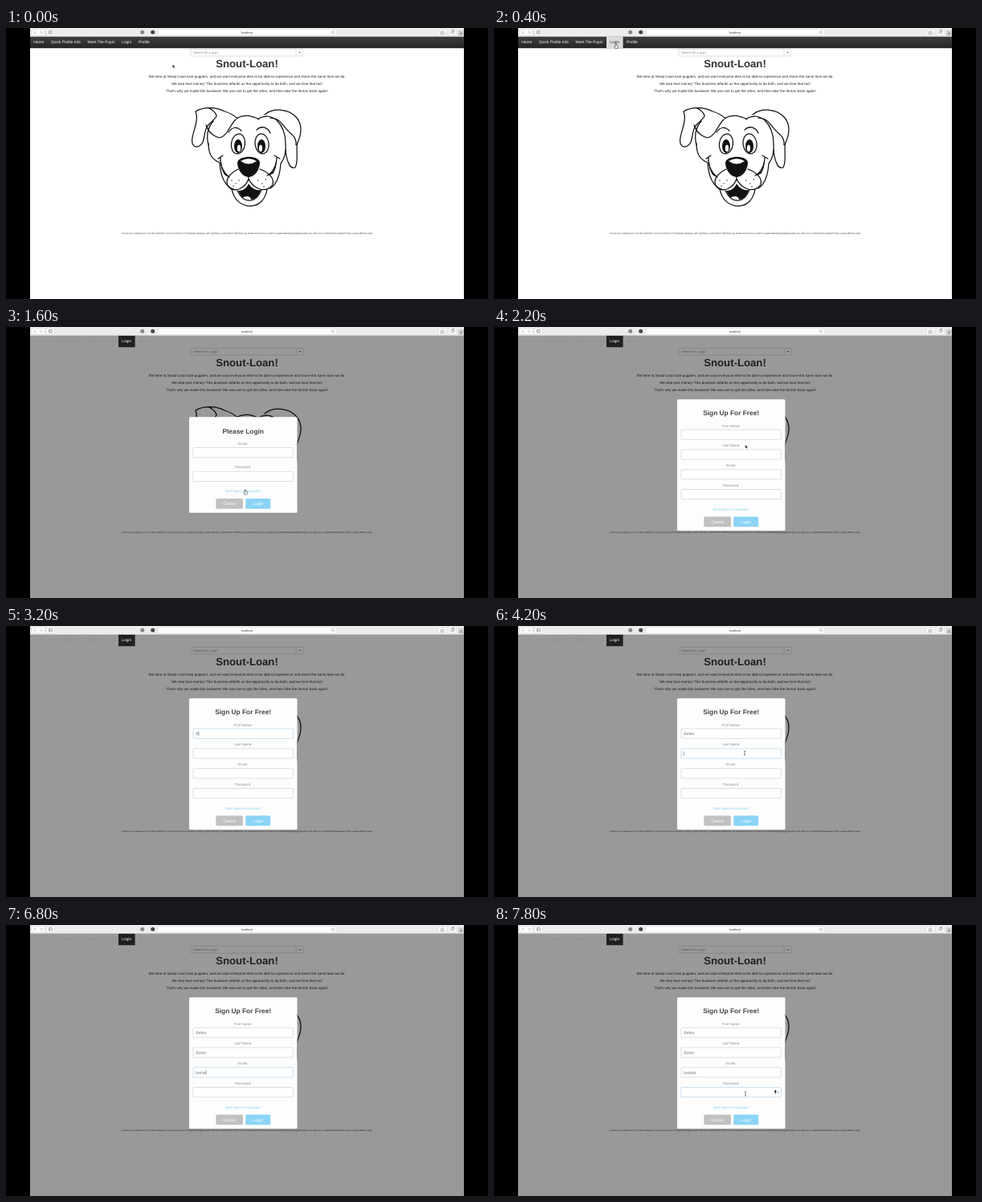
Animation of 600 by 338 pixels, one loop 8 s. Source, as an HTML page:

```html
<!DOCTYPE html>
<html lang="en">
<head>
<meta charset="utf-8">
<title>Snout-Loan</title>
<style>
  html, body { margin: 0; width: 100%; height: 100%; overflow: hidden; background: #000; }
  svg { display: block; width: 100%; height: 100%; font-family: "Liberation Sans", Arial, sans-serif; text-rendering: geometricPrecision; }
  .mid { text-anchor: middle; }
  .body { font-size: 4.5px; fill: #222; }
  .bar { font-size: 4.83px; fill: #fff; }
  .line { fill: none; stroke: #111; stroke-width: 1.25; stroke-linecap: round; stroke-linejoin: round; }
  .icon { fill: none; stroke: #777; stroke-width: .6; }
  .key { fill: #fdfdfd; stroke: #ccc; stroke-width: .4; }
  .title { font-size: 8.33px; font-weight: bold; fill: #444; }
  .label { font-size: 4.4px; fill: #8c8c8c; }
  .field { fill: #fff; stroke: #c9c9c9; stroke-width: .6; }
  .typed { font-size: 5.1px; fill: #777; }
  .link { font-size: 4.25px; fill: #7fd0f2; }
  .button { font-size: 5.1px; fill: #fff; }
</style>
</head>
<body>
<svg viewBox="0 0 600 338">
  <defs>
    <linearGradient id="dark" x2="0" y2="1"><stop stop-color="#404040"/><stop offset="1" stop-color="#252525"/></linearGradient>
  </defs>
  <rect width="600" height="338"/>
  <rect x="30" width="540" height="338" fill="#fff"/>

  <g id="page">
    <rect x="229.8" y="26.3" width="140.2" height="8.7" rx="1" fill="#fff" stroke="#c8c8c8" stroke-width=".6"/>
    <path d="M361 26.3v8.7" stroke="#c8c8c8" stroke-width=".6"/>
    <path d="M364.3 30h2.6l-1.3 1.6z" fill="#444"/>
    <text x="233" y="32" font-size="4" fill="#888">Search for a pup!</text>
    <text class="mid" x="300" y="49.2" font-size="13.2" font-weight="bold" fill="#333">Snout-Loan!</text>
    <g class="mid body">
      <text x="300" y="61.6">We here at Snout-Loan love puppers, and we want everyone else to be able to experience and share the same love we do.</text>
      <text x="300" y="70.6">We also love money! This business affords us the opportunity to do both, and we love that too!</text>
      <text x="300" y="79.7">That's why we made this business! We use one to get the other, and then take the former back again!</text>
    </g>
    <text class="mid" x="300" y="256.9" font-size="2.83" fill="#333">Loved your experience? Love the website? Love the pictures? Completely disagree with anything I said before? Well then go ahead and send an email to wagsandbelliesgang@example.com with your compliment/complaint! Have a splendiferous day!</text>

    <g class="line">
      <!-- ears and head -->
      <path d="M236 104C245 98 262 98 272 104C279 106 284 109 288 113M236 104C240 115 234 125 232 137C230 147 236 150 241 147C249 142 245 130 251 122C255 117 260 114 262 110C262 106 256 101 252 100"/>
      <path d="M258 116C251 124 249 134 252 146M288 112C296 108 306 109 315 114"/>
      <path d="M249 121C252 130 258 135 266 137C276 134 278 122 286 114"/>
      <path d="M314 113C324 108 330 110 337 115C344 122 348 132 348 144C349 156 346 164 342 169C341 183 337 195 329 200"/>
      <path d="M322 108C333 99 352 101 361 111C370 121 368 132 363 143C360 152 365 164 360 174C353 177 349 164 348 152M329 112C342 112 345 124 354 131C359 135 362 139 361 146"/>
      <path d="M252 144C252 158 257 164 266 168C267 184 272 197 283 201"/>
      <!-- cheeks and brows -->
      <path d="M267 161C266 171 271 181 278 186M264 163L270 159M337 161C337 173 331 181 325 184M334 159L341 163M277 130C281 124 287 122 293 128M312 127C318 121 326 124 329 131"/>
      <!-- eyes -->
      <ellipse cx="289" cy="144.500" rx="8.5" ry="12.500" transform="rotate(8 289 144)"/>
      <ellipse cx="318.500" cy="144.500" rx="8.5" ry="12.500" transform="rotate(-8 318 144)"/>
      <!-- muzzle, mouth and chin -->
      <path d="M289 176C279 181 271 190 277 198C285 206 298 200 302 188C308 201 322 206 331 197C336 188 327 180 316 176M302 184V190"/>
      <path d="M281 201C284 214 292 222 304 222C316 222 323 213 325 201M288 203C292 211 297 216 304 215C311 215 315 209 318 202"/>
    </g>
    <g fill="#111">
      <ellipse cx="289" cy="147.500" rx="5" ry="8.5"/>
      <ellipse cx="318" cy="147.500" rx="5" ry="8.5"/>
      <path d="M288 168C289 159 315 158 316 168C316 177 309 186 302 186C295 186 288 177 288 168Z"/>
      <path d="M289 203C296 203 300 199 302 194C305 199 310 203 317 202C314 210 310 214 305 214C305 209 297 209 294 212Z"/>
      <path d="M267 163L270 178L278 187L272 183Q267 176 267 163ZM337 163L333 178L326 184L332 182Q337 176 337 163Z"/>
      <g id="freckles"></g>
    </g>
    <g fill="#fff">
      <ellipse cx="290" cy="150" rx="2.1" ry="4.3"/>
      <ellipse cx="317" cy="150" rx="2.1" ry="4.3"/>
      <path d="M292 166Q302 160 312 166Q302 173 292 166Z"/>
    </g>
  </g>

  <rect id="shade" x="30" y="10.500" width="540" height="328" fill-opacity=".4"/>
  <g id="nav">
    <rect id="strip" x="30" y="10.500" width="540" height="14.700" fill="url(#dark)"/>
    <g id="items" class="bar">
      <text x="34.300" y="19.400">Home</text>
      <text x="56" y="19.400">Quick Profile Info</text>
      <text x="101.500" y="19.400">Meet The Pups!</text>
      <text x="165" y="19.400">Profile</text>
    </g>
    <rect id="loginTab" x="140" y="10.500" width="20.600" height="14.700"/>
    <text id="loginText" class="bar" x="144.300" y="19.400">Login</text>
  </g>

  <g id="toolbar">
    <rect x="30" width="540" height="10.600" fill="#ececec"/>
    <path d="M30 10.500H570" stroke="#b9b9b9" stroke-width=".5"/>
    <rect class="key" x="32" y="1.500" width="16" height="7.500" rx="1"/>
    <rect class="key" x="50.500" y="1.500" width="10" height="7.500" rx="1"/>
    <rect class="key" x="189" y="1.500" width="222" height="7.800" rx="1"/>
    <rect class="key" x="538.500" y="1.500" width="9.500" height="7.500" rx="1"/>
    <rect class="key" x="551" y="1.500" width="9.500" height="7.500" rx="1"/>
    <path class="icon" d="M36.700 3.800L35.300 5.300L36.700 6.800M43.300 3.800L44.700 5.300L43.300 6.800M53.500 3.500H57.700V7H53.500ZM55 3.500V7M542 4.500H541.500V7.500H545V4.500H544.500M543.200 6V2.600M554 3.500H557V6.500H554ZM555.500 3V2.700H558V5.500M408.200 4.200A1.500 1.500 0 1 0 408.600 5.600"/>
    <circle cx="169.700" cy="5.200" r="2.500" fill="#888"/>
    <circle cx="182.700" cy="5.200" r="2.500" fill="#444"/>
    <text class="mid" x="300" y="6.700" font-size="3.600" fill="#333">localhost</text>
    <rect x="563" y="3" width="7" height="7.500" fill="#d0d0d0"/>
    <path class="icon" d="M564.600 7H568.400M566.500 5.100V8.900"/>
  </g>

  <g id="loginBox"></g>
  <g id="signupBox"></g>

  <g id="arrow"><path d="M0 0V4.200L1 3.300L1.700 4.800L2.400 4.500L1.700 3H3Z" fill="#000" stroke="#fff" stroke-width=".25"/></g>
  <g id="hand"><path d="M-.6 0Q0-.8.6 0V2L2.400 2.600V4.600L1.800 6H-.8L-2.200 3.600Q-1.700 2.800-.6 3.600Z" fill="#fff" stroke="#111" stroke-width=".5"/></g>
  <g id="beam"><path d="M-1.200-2.700Q0-2.700 0-2Q0-2.700 1.200-2.700M0-2V2M-1.200 2.700Q0 2.700 0 2Q0 2.700 1.200 2.700" fill="none" stroke="#333" stroke-width=".6"/></g>
</svg>
<script>
const STEP = 200, LOOP = 8000;
const $ = id => document.getElementById(id);
const show = (id, on) => $(id).setAttribute("display", on ? "inline" : "none");
const text = (cls, x, y, s, extra = "") => `<text class="${cls}" x="${x}" y="${y}" ${extra}>${s}</text>`;

$("freckles").innerHTML = [[281, 190], [286, 194], [290, 190], [283, 197], [314, 190], [319, 194], [323, 189], [321, 198]]
  .map(([x, y]) => `<circle cx="${x}" cy="${y}" r=".7"/>`).join("");

// A dialog holds a title, labelled fields, a link and two buttons.
function dialog(id, top, bottom, title, titleY, fields, linkY, buttonY) {
  const rows = fields.map(([label, labelY, y], i) =>
    text("mid label", 295.2, labelY, label) +
    `<rect id="${id}Field${i}" class="field" x="233" y="${y}" width="124.500" height="12.200" rx="1"/>` +
    text("typed", 236.3, y + 8, "", `id="${id}Text${i}"`)).join("");
  const button = (x, w, color, s) =>
    `<rect x="${x}" y="${buttonY}" width="${w}" height="12.700" rx="1.500" fill="${color}"/>` +
    text("mid button", x + w / 2, buttonY + 8.2, s);
  $(id).innerHTML =
    `<rect x="228" y="${top}" width="134.500" height="${bottom - top}" rx="1.500" fill="#fdfdfd"/>` +
    text("mid title", 295.2, titleY, title) + rows +
    text("mid link", 295.2, linkY, "Dont Have An Account?") +
    button(261.3, 33.7, "#c1c1c1", "Cancel") + button(298.2, 31, "#8cd4f5", "Login") +
    `<path id="${id}Caret" stroke="#666" stroke-width=".6"/>` +
    `<path id="${id}Key" d="M349 207.200a1.300 1.300 0 1 1 2.600 0l-.7 1v2h-1.200v-2zM352.400 208.500h1.800l-.9 1.200z" fill="#222"/>`;
}
dialog("loginBox", 112.3, 231.8, "Please Login", 132.9,
  [["Email:", 146.8, 150.5], ["Password:", 176.3, 180.3]], 206, 214);
dialog("signupBox", 90.3, 254, "Sign Up For Free!", 110.4,
  [["First Name:", 124.6, 128.1], ["Last Name:", 149.4, 152.9], ["Email:", 174.2, 177.7], ["Password:", 199, 202.5]], 228.7, 236.6);
show("loginBoxKey", false);

// Pointer path: [step, x, y, shape]; an empty shape hides it while typing.
const pointer = [
  [0, 207.5, 45.5, "arrow"], [1, 181, 34, "arrow"], [2, 151.8, 19.5, "hand"], [3, 266, 85.5, "arrow"],
  [5, 292, 176, "arrow"], [6, 298, 203, "hand"], [9, 298, 203, "arrow"], [11, 313, 147, "arrow"],
  [13, 325, 242, "arrow"], [15, 316, 135, "beam"], [16, 316, 135, ""], [20, 314, 152, "beam"],
  [21, 312, 158.5, "beam"], [22, 312, 158.5, ""], [27, 308, 186, "beam"], [29, 308, 186, ""],
  [36, 313, 200, "beam"], [37, 313, 210.5, "beam"], [40, 313, 210.5, "beam"]
];
// Typing: [field, value, step of each new character]
const typing = [
  ["Bettie", [16, 17, 18, 19, 19, 20]],
  ["Baker", [22, 23, 24, 25, 25]],
  ["", []],
  ["", []]
];
typing[2] = ["bettieb", [29, 30, 31, 32, 33, 34, 35]];
const focusSteps = [15, 21, 28, 37];

function drawPointer(step) {
  const i = pointer.findLastIndex(p => p[0] <= step);
  const [s0, x0, y0, shape] = pointer[i], [s1, x1, y1] = pointer[i + 1];
  const k = (step - s0) / (s1 - s0);
  for (const id of ["arrow", "hand", "beam"]) show(id, id === shape);
  if (shape) $(shape).setAttribute("transform", `translate(${x0 + (x1 - x0) * k} ${y0 + (y1 - y0) * k})`);
}

function drawForm(step) {
  const focus = focusSteps.findLastIndex(s => s <= step);
  typing.forEach(([value, steps], i) => {
    $("signupBoxText" + i).textContent = value.slice(0, steps.filter(s => s <= step).length);
    $("signupBoxField" + i).style.stroke = i === focus ? "#a9cbe6" : "";
  });
  show("signupBoxKey", focus === 3);
  show("signupBoxCaret", focus >= 0 && step !== 39);
  if (focus >= 0) {
    const field = $("signupBoxText" + focus);
    const x = 236.6 + (field.textContent ? field.getComputedTextLength() : 0);
    $("signupBoxCaret").setAttribute("d", `M${x} ${+field.getAttribute("y") - 4.8}v5.800`);
  }
}

function draw(step) {
  const open = step >= 3, signup = step >= 9, hover = step === 2;
  show("shade", open);
  show("strip", !open);
  $("items").style.fill = open ? "#8f8f8f" : "#fff";
  show("loginTab", open || hover);
  $("loginTab").setAttribute("fill", open ? "#202020" : "#dcdcdc");
  $("loginText").style.fill = hover ? "#333" : "#fff";
  show("loginBox", open && !signup);
  show("signupBox", signup);
  const scale = step === 3 ? 0.955 : 1;
  $("loginBox").setAttribute("transform", `translate(295.200 172) scale(${scale}) translate(-295.200 -172)`);
  drawForm(step);
  drawPointer(step);
}

function tick() {
  draw(Math.floor(performance.now() % LOOP / STEP));
  requestAnimationFrame(tick);
}
tick();
</script>
</body>
</html>
```
